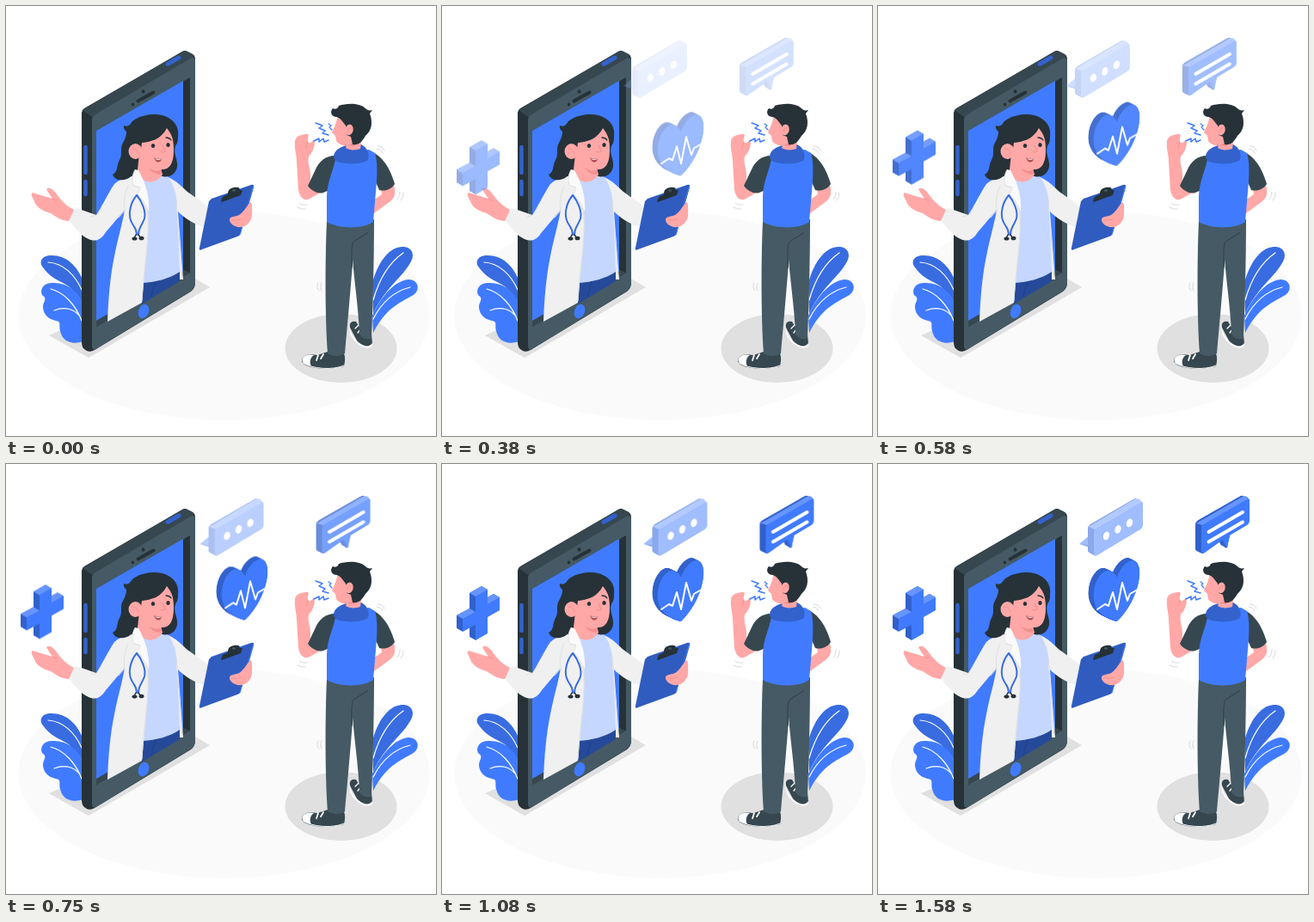
Write an HTML page with a canvas that moves like this. It is 500 px wide and 500 px high and loops after 1620 ms.

```html
<!DOCTYPE html>
<html lang="en">
<head>
<meta charset="utf-8">
<title>Online doctor</title>
<style>
html, body { margin: 0; width: 100%; height: 100%; overflow: hidden; background: #fff; }
canvas { display: block; width: 500px; height: 500px; }
</style>
</head>
<body>
<canvas id="stage" width="500" height="500"></canvas>
<script>
const SIZE = 500, LOOP = 1620, STEPS = 39;
const BLUE = '#407bff', BLUE_LIGHT = '#6695ff', BLUE_MID = '#386ce0', BLUE_DARK = '#3362cc';
const INK = '#263238', SLATE = '#37474f', STEEL = '#455a64';
const SKIN = '#ffa8a7', SKIN_DARK = '#f28f8f', COAT = '#f0f0f0', FOLD = '#e0e0e0';

let pen;

function layer(draw) {
  const canvas = document.createElement('canvas');
  canvas.width = canvas.height = SIZE;
  pen = canvas.getContext('2d');
  pen.lineCap = pen.lineJoin = 'round';
  draw();
  return canvas;
}

function fill(path, color) {
  pen.fillStyle = color;
  pen.fill(new Path2D(path));
}

function line(path, color, width) {
  pen.strokeStyle = color;
  pen.lineWidth = width;
  pen.stroke(new Path2D(path));
}

function oval(x, y, rx, ry, color, angle = 0) {
  pen.fillStyle = color;
  pen.beginPath();
  pen.ellipse(x, y, rx, ry, angle, 0, Math.PI * 2);
  pen.fill();
}

// Sweeps a shape backwards to give it an isometric thickness.
function solid(path, dx, dy, side, front) {
  const copies = 24;
  for (let i = copies; i > 0; i--) {
    pen.save();
    pen.translate(dx * i / copies, dy * i / copies);
    fill(path, side);
    pen.restore();
  }
  fill(path, front);
}

function ground() {
  oval(253.5, 360, 239, 121.5, '#fafafa');
  fill('M50 383L96 409L237 327L210 311Z', FOLD);
  oval(389.5, 398, 65, 40, FOLD);
}

function leftPlant() {
  fill('M90 320C82 301 70 290 53 290C41 290 38 298 43 304C51 316 62 319 73 326L90 346Z', BLUE_MID);
  line('M49 298C66 299 80 312 88 330', '#fff', 1.2);
  fill('M90 346C83 331 70 321 54 322C43 322 39 330 42 336C49 341 43 343 43 351C44 359 49 364 58 366C65 367 61 371 63 378C66 391 77 394 90 390Z', BLUE);
  line('M52 329C68 333 81 348 88 366M56 354C68 349 79 352 86 361', '#fff', 1.2);
}

function rightPlant() {
  fill('M426 322C432 300 444 281 460 280C471 279 476 288 471 297C462 315 440 328 427 358Z', BLUE_MID);
  line('M427 342C434 317 446 298 462 287', '#fff', 1.2);
  fill('M426 360C435 340 450 320 468 318C479 318 482 329 475 335C462 344 443 348 427 380Z', BLUE);
  line('M427 364C437 344 450 332 470 327', '#fff', 1.2);
}

function phone() {
  fill('M88 124Q88 121 91 119L205 53Q208 51 211 53L217 56Q220 58 220 62L220 322Q220 328 215 332L103 400Q98 403 94 401L91 399Q88 396 88 391Z', INK);
  fill('M89 121L205 53Q208 51 211 53L217 56L219 58L100 129Z', SLATE);
  fill('M100 132Q100 128 104 126L214 61Q220 58 220 65L220 321Q220 328 214 332L106 398Q100 402 100 395Z', STEEL);
  fill('M105 145L214 83L214 310L105 373Z', INK);
  fill('M105 366L206 307L214 310L105 373Z', SLATE);
  fill('M105 145L206 87L206 308L105 366Z', BLUE);
  line('M153.500 110.500L171.500 100.500', INK, 4);
  oval(147.500, 114.500, 1.700, 2, INK);
  oval(159.500, 99.500, 2, 2.200, INK);
  line('M188 67.500L201 60', BLUE_DARK, 5);
  line('M92.500 164L92.500 194M92.500 204L92.500 219', BLUE_DARK, 4.500);
  oval(160, 355, 6, 8.500, BLUE, .35);
}

function doctorBody() {
  fill('M186 198C199 203 205 211 211 216L236 234L231 257C218 254 207 246 200 239L206 318L201 318Z', COAT);
  fill('M157 347L160 319L202 306L202 320Z', '#264a99');
  line('M174 319L169 338', '#204085', 1);
  fill('M155 194L184 194C193 202 198 215 199 232L202 309C191 317 174 321 159 322L158 212Z', '#c5d7ff');
  line('M198 225C199 250 203 276 204 312', FOLD, 1.200);
  fill('M150 192C145 201 134 199 126 207C118 219 111 234 105 243L82 235C77 237 73 243 73 249C80 258 87 267 96 271C105 275 111 271 116 263L138 237C135 255 130 270 126 291C121 315 119 341 118 367L158 345L162 301C166 272 167 246 161 214L155 190Z', COAT);
}

function doctorHead() {
  fill('M147 134C158 125 181 123 193 133C203 141 201 154 197 163C194 171 200 178 199 187C197 196 190 200 182 198L155 194C150 198 146 197 143 200C135 204 127 203 124 196C131 192 128 186 132 179C136 172 132 165 136 159C140 152 140 148 140 146Q136 143 137 139Q141 141 144 138Z', INK);
  fill('M155 172L153 190C157 209 174 208 182 196L179 184Z', SKIN);
  fill('M166 188C172 193 178 192 181 190L180 196C174 196 169 193 166 188Z', SKIN_DARK);
  fill('M157 155L187 140C194 147 195 158 195 168C195 183 190 190 182 190C171 190 162 185 157 178Z', SKIN);
  fill('M145 164C139 146 150 128 170 126C190 125 201 137 200 153C200 160 197 164 195 160C194 151 190 146 187 142C181 154 170 158 158 159L157 166Z', INK);
  oval(150.500, 169, 8, 9, SKIN);
  line('M147 166Q152 165 154 172', SKIN_DARK, 1);
  oval(171, 162.500, 2.200, 2.500, INK);
  oval(188.500, 161.500, 2.200, 2.500, INK);
  line('M166 157Q168 154 172 155M186 153Q190 153 192 156', INK, 1.300);
  line('M182 162L185 169Q182 171 180 169', SKIN_DARK, 1.100);
  fill('M172 176Q176 179 181 177Q180 183 175 181Q173 180 172 176Z', '#b14e55');
  line('M174 178Q177 179.500 180 178', '#fff', .8);
}

function doctorCollar() {
  fill('M150 190C146 197 146 203 149 208L156 210L153 218C159 224 163 231 166 239C167 222 163 207 154 191Z', '#fafafa');
  line('M150 191C145 200 147 207 149 209L156 211L153 219C160 226 163 233 165 240', FOLD, .9);
  line('M138 238C136 225 139 216 142 209M138 238L131 246M99 245L106 243L111 235M165 241C167 269 160 305 158 343', FOLD, 1);
}

function doctorProps() {
  line('M152 220C145 228 142 241 145 249C147 256 152 257 152 266M152 220C158 227 163 239 161 247C159 254 154 257 154 266', BLUE_MID, 2);
  line('M151 266L149 270M154 266L157 270', INK, 1.500);
  oval(149.500, 270.500, 3, 2, INK);
  oval(157.500, 270, 3, 2.300, INK);

  fill('M79 237C71 233 64 226 59 219C55 213 50 210 47 213C49 217 52 221 54 224C46 222 38 219 31 217C28 219 31 223 33 227C34 233 43 239 52 241C59 246 66 250 73 250Z', SKIN);
  line('M54 224Q57 226 59 226', SKIN_DARK, 1);

  fill('M239 224L285 208Q289 207 288 211L273 264Q272 267 269 268L228 283Q224 285 225 281L236 227Z', '#305cbf');
  line('M287.500 209L272 266', BLUE, 1);
  fill('M250 227L252 222L258 219C258 214 260 212 265 211C270 210 272 211 272 214L275 214L273 220L251 228Z', INK);
  oval(265, 214.500, 2, 1.300, STEEL);
  fill('M284 228C287 228 286 238 286 244C285 251 279 257 273 257C267 258 260 253 260 249C259 245 266 245 271 243C276 240 279 234 284 228Z', SKIN);
  line('M263 249Q270 250 274 248', SKIN_DARK, .9);
}

function manLegs() {
  fill('M400 374C399 368 402 366 407 367L412 375L425 382L426 393C421 399 413 395 408 389Z', SLATE);
  fill('M400 371C399 378 404 387 411 392C418 397 423 396 426 392L426 395C421 400 413 397 407 391C401 386 398 378 400 371Z', '#fff');
  line('M406 375L410 371M409 380L412 376', '#fff', 1.300);
  fill('M345 409C349 404 356 405 362 406L374 402L393 404C395 409 394 414 393 419L377 422C366 422 354 421 347 417C344 415 343 412 345 409Z', SLATE);
  fill('M345 409C348 405 355 405 358 406C353 409 353 415 355 419L347 416C344 414 344 411 345 409Z', '#fff');
  line('M345 415C356 422 380 424 393 418', '#fff', 1);
  line('M361 412L363 406M366 410L369 405', '#fff', 1.800);

  fill('M400 252L428 248C428 284 427 345 425 386C420 389 414 386 411 382C410 350 404 315 402 280Z', STEEL);
  fill('M373 250L416 252L405 276C402 311 399 351 394 404C389 408 380 408 374 404C371 360 371 296 373 250Z', STEEL);
  line('M420 264C412 270 406 271 403 276C401 287 402 295 402 304', SLATE, 1.300);
}

function manBody() {
  fill('M436 213L451 208C453 216 453 222 447 227L428 241L427 226L437 219Z', SKIN);
  fill('M426 170C440 176 448 193 452 207C448 213 441 216 434 214L427 198Z', SLATE);
  fill('M353 212L354 200C355 190 350 184 352 175C358 169 360 160 358 155C356 158 353 161 351 158C350 153 353 151 351 149C344 149 337 151 336 157C335 166 338 173 338 181L340 214C342 224 348 228 355 223L369 215Z', SKIN);
  line('M351 158L349 165', SKIN_DARK, 1);
  fill('M385 174C373 173 364 180 360 190L351 209C355 215 363 219 369 217L376 214L386 198Z', SLATE);
  fill('M384 172C382 190 373 203 373 222L373 251C386 259 415 260 427 251L430 216C432 195 432 180 429 171L422 167Z', BLUE);
}

function manHead() {
  fill('M381 174C382 168 389 163 397 162L413 161C421 165 424 174 420 180C409 185 393 184 385 181C382 179 381 177 381 174Z', BLUE_DARK);
  fill('M386 128L407 130L413 158L412 166C407 168 399 168 395 165L396 162C391 163 386 160 384 157L383 151L379 147L383 138Z', SKIN);
  fill('M396 162C401 161 405 158 408 154L405 163Z', SKIN_DARK);
  fill('M387 116C395 113 411 112 418 119C420 121 422 122 426 121L423 125C427 136 425 145 418 151C413 159 410 162 403 161L401 152L396 150L395 139C391 134 389 130 384 129C377 128 377 122 380 119C383 121 386 119 387 116Z', INK);
  oval(399, 144, 4.700, 6.300, SKIN, .2);
  line('M397 146Q398 140 402 142', SKIN_DARK, 1);
}

function coughAndTremor() {
  line('M360 136L368 139L364 142L371 145L368 148L375 150', BLUE, 1.500);
  line('M375 137L378 139L376 141L379 144', BLUE, 1.200);
  line('M358 157L364 154L364 158L369 154L370 158L375 156', BLUE, 1.500);
  line('M341 229Q344 232 350 231M339 234Q343 237 348 236', '#d8d8d8', 1);
  line('M458 216Q459 221 455 225M462 217Q463 222 459 226', '#d8d8d8', 1);
  line('M431 166Q436 166 438 171M432 163Q438 163 440 168', '#d8d8d8', 1);
  line('M363 322Q360 327 364 331M367 322Q364 327 367 331', '#d8d8d8', 1);
}

function crossAndHeart() {
  solid('M39 154L53 146L53 163L67 155L67 170L53 178L53 197L39 205L39 187L24 195L24 180L39 172Z', -7, -4, BLUE_DARK, BLUE);
  fill('M39 154L53 146L46 142L32 150ZM53 163L67 155L60 151L53 155ZM24 180L39 172L32 168L17 176Z', BLUE_LIGHT);
  solid('M278 183C266 180 254 174 251 158C249 141 258 125 267 124C273 124 276 128 278 132C281 122 288 113 296 112C303 113 305 121 304 131C302 151 290 172 278 183Z', -6, -3, BLUE_DARK, BLUE);
  line('M255 169L264 163L268 165L273 149L278 169L284 138L290 159L293 151L302 146', '#fff', 2);
}

function bubbles() {
  fill('M234 93L246 83L250 98Z', '#a0bdff');
  fill('M234 93L248 95L250 98Z', '#88a7ea');
  solid('M251 79Q251 76 254 74L304 45Q308 43 308 47L308 71Q308 74 305 76L255 106Q251 108 251 104Z', -7, -4, '#8ba9eb', '#a0bdff');
  fill('M245 73L297 42Q301 39 304 41L307 44L252 76Z', '#b3caff');
  for (const i of [0, 1, 2]) oval(265.500 + i * 13.500, 83.500 - i * 7.500, 3.500, 5, '#fff', .3);

  fill('M397 88L404 98L409 84Z', BLUE_DARK);
  solid('M376 74Q376 71 379 69L428 41Q432 39 432 43L432 66Q432 69 429 71L409 83L406 98L401 88L380 103Q376 106 376 101Z', -7, -3.500, BLUE_DARK, BLUE);
  fill('M370 69L422 39Q426 36 429 38L431 40L377 71Z', BLUE_LIGHT);
  line('M384.500 79L424 56M384.500 90.500L424 67.500', '#fff', 4);
}

function bezier(a, b, s) {
  const r = 1 - s;
  return 3 * r * r * s * a + 3 * r * s * s * b + s * s * s;
}

// Slow start, slight overshoot, then settling at 1.
function spring(x) {
  if (x >= 1) return 1;
  let low = 0, high = 1;
  for (let i = 0; i < 24; i++) {
    const mid = (low + high) / 2;
    if (bezier(.36, .5, mid) < x) low = mid; else high = mid;
  }
  return bezier(-.01, 1.38, low);
}

const scene = layer(() => {
  [ground, leftPlant, phone, doctorBody, doctorHead, doctorCollar, doctorProps,
    rightPlant, manLegs, manBody, manHead, coughAndTremor].forEach(part => part());
});
const risers = layer(crossAndHeart);
const sliders = layer(bubbles);
const stage = document.getElementById('stage').getContext('2d');

function place(image, x, y, progress) {
  stage.globalAlpha = Math.max(0, Math.min(1, progress));
  stage.drawImage(image, x, y);
}

function render(now) {
  const step = LOOP / STEPS;
  const t = Math.floor((now % LOOP) / step + .05) % STEPS * step;
  const rise = t ? spring((t + 20) / 1000) : 0;
  const slide = t ? spring((t + 20) / 1580) : 0;
  stage.globalAlpha = 1;
  stage.fillStyle = '#fff';
  stage.fillRect(0, 0, SIZE, SIZE);
  stage.drawImage(scene, 0, 0);
  place(risers, 0, 30 * (1 - rise), rise);
  place(sliders, -30 * (1 - slide), 0, slide);
}

const start = performance.now();
function tick() {
  render(performance.now() - start);
  requestAnimationFrame(tick);
}
tick();
</script>
</body>
</html>
```
